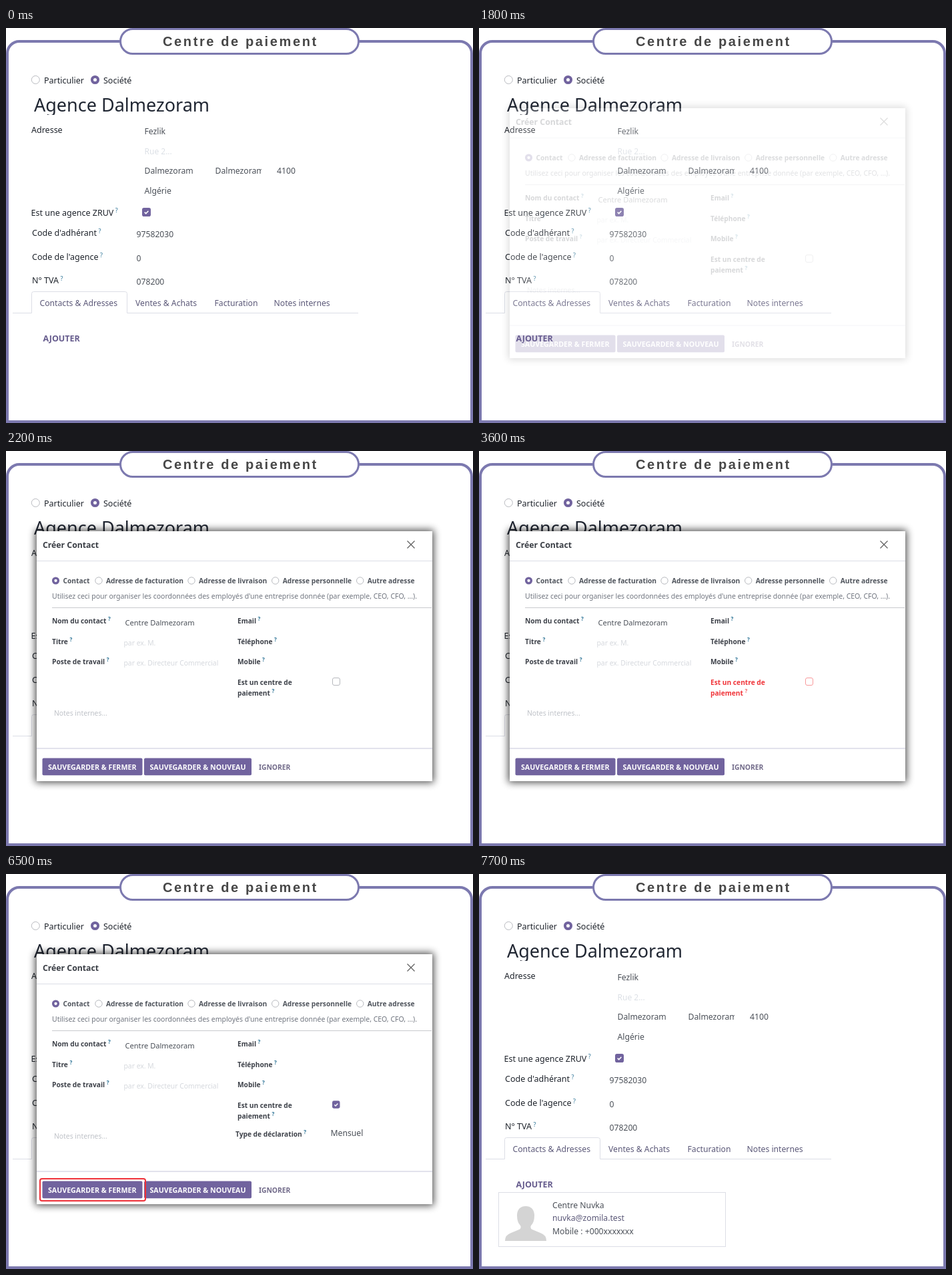
These frames come from a looping animation (700x591 px, 8000 ms). An HTML page:

```html
<!DOCTYPE html>
<html lang="fr">
<head>
<meta charset="utf-8">
<title>Centre de paiement</title>
<style>
html, body { margin: 0; width: 100%; height: 100%; overflow: hidden; background: #fff; }
svg { display: block; width: 100%; height: 100%; }
text { font-family: "Noto Sans", "Open Sans", sans-serif; white-space: pre; }
.head { font: bold 20px "Liberation Sans", Arial, sans-serif; letter-spacing: 2.62px; fill: #474747; }
.title { font-size: 27px; fill: #212733; }
.label { font-size: 12.5px; font-weight: 500; fill: #1f242c; }
.value { font-size: 12.2px; fill: #4b5058; }
.tab { font-size: 12.2px; fill: #5b5878; }
.add { font-size: 12.5px; font-weight: 600; fill: #665c8d; }
.ghost { font-size: 12px; fill: #dce0e6; }
.mTitle { font-size: 12.25px; font-weight: 600; fill: #3a3e45; }
.mLabel { font-size: 10.2px; font-weight: 600; fill: #3d4149; }
.mKind { font-size: 10.25px; font-weight: 600; fill: #50555d; }
.mNote { font-size: 10.46px; fill: #70757f; }
.mGhost { font-size: 10.35px; fill: #d6d9de; }
.mGhost.dark { fill: #bfc2c8; }
.mValue { font-size: 11.1px; fill: #4b5058; }
.mButton { font-size: 10.65px; font-weight: 600; fill: #fff; }
.mSkip { font-size: 10.3px; font-weight: 600; fill: #716a89; }
.hint { font-size: 9px; font-weight: 500; fill: #2c7396; }
.mLabel .hint { font-size: 8px; font-weight: 600; }
.alert .mLabel { fill: #f0353a; }
.alert .hint { fill: #f2676a; }
.alert rect { stroke: #f99a9c; }
.ring { fill: none; stroke: #ef3038; stroke-width: 2; }
.line { fill: none; stroke: #dcdee6; }
</style>
</head>
<body>
<svg id="stage" viewBox="0 0 700 591" xmlns="http://www.w3.org/2000/svg"></svg>
<script>
const PURPLE = '#71639e';
const FRAME = '#7c79af';
const LOOP = 8000;

const text = (cls, x, y, s) =>
  `<text class="${cls}" x="${x}" y="${y}">${s.replace(/&/g, '&amp;')}</text>`;

const hinted = (cls, x, y, s) =>
  `<text class="${cls}" x="${x}" y="${y}">${s}<tspan class="hint" dx="2.5" dy="-4.5">?</tspan></text>`;

const radio = (x, y, r, on) => on
  ? `<circle cx="${x}" cy="${y}" r="${r * 0.7}" fill="#fff" stroke="${PURPLE}" stroke-width="${r * 0.62}"/>`
  : `<circle cx="${x}" cy="${y}" r="${r - 0.3}" fill="#fff" stroke="#b9bbc0"/>`;

const checked = (x, y, size) =>
  `<g transform="translate(${x} ${y}) scale(${size / 13})">
    <rect width="13" height="13" rx="2.8" fill="${PURPLE}"/>
    <path d="M3.7 6.7 5.7 8.6 9.4 4.7" fill="none" stroke="#fff" stroke-width="1.6"/>
  </g>`;

const button = (x, w, s) =>
  `<rect x="${x}" y="459.5" width="${w}" height="25.7" rx="2" fill="${PURPLE}"/>` +
  text('mButton', x + 8.5, 476.5, s);

const town = 'Dalmezoram';

const form = `
  ${radio(44.3, 77.5, 6.3)}${text('label', 57, 82.5, 'Particulier')}
  ${radio(133.5, 77.5, 6.5, true)}${text('label', 146, 82.5, 'Société')}
  <g clip-path="url(#titleClip)">${text('title', 42, 125, 'Agence ' + town)}</g>
  ${text('label', 38, 157, 'Adresse')}
  ${text('value', 207.5, 159, 'Fezlik')}
  ${text('ghost', 207.5, 189, 'Rue 2...')}
  ${text('value', 207.5, 218, town)}
  <g clip-path="url(#cityClip)">${text('value', 313.5, 218, town)}</g>
  ${text('value', 406, 218, '4100')}
  ${text('value', 207.5, 248, 'Algérie')}
  ${hinted('label', 37.5, 280.5, 'Est une agence ZRUV')}${checked(204, 269, 13)}
  ${hinted('label', 39, 311, "Code d'adhérant")}${text('value', 195.5, 313, '97582030')}
  ${hinted('label', 39, 347, "Code de l'agence")}${text('value', 195.5, 349, '0')}
  ${hinted('label', 39, 382, 'N° TVA')}${text('value', 195.5, 384, '078200')}
  <path class="line" d="M10 426.5H38.5V397.5q0-3 3-3H178.5q3 0 3 3V426.5H528"/>
  ${text('tab', 50.5, 416, 'Contacts & Adresses')}
  ${text('tab', 194, 416, 'Ventes & Achats')}
  ${text('tab', 312.5, 416, 'Facturation')}
  ${text('tab', 401.5, 416, 'Notes internes')}
  ${text('add', 55.5, 469, 'AJOUTER')}
  <rect id="addRing" class="ring" x="38" y="447" width="91" height="33" rx="3"/>`;

const card = `
  <g id="card">
    <rect class="line" x="29.5" y="476.5" width="340" height="81"/>
    <path fill="#d4d4d4" d="M39 549q0-9 9-12l12-5q4-2 2-6-5-5-5-15c0-9 5-14 13-14s13 5 13 14q0 10-5 15-2 4 2 6l12 5q9 3 9 12z"/>
    ${text('value', 110, 500, 'Centre Nuvka')}
    ${text('tab', 110, 519, 'nuvka@zomila.test')}
    ${text('value', 110, 539, 'Mobile : +000xxxxxxx')}
  </g>`;

const kinds = [
  [74.5, 'Contact'], [139, 'Adresse de facturation'], [278, 'Adresse de livraison'],
  [403.7, 'Adresse personnelle'], [530.7, 'Autre adresse']
].map(([x, s], i) => radio(x, 194, 5.5, !i) + text('mKind', x + 11, 198, s)).join('');

const modal = `
  <g id="modal">
    <rect x="44" y="118" width="597" height="378" fill="#000" opacity=".7" filter="url(#blur)"/>
    <rect x="46" y="120" width="593" height="374" fill="#fff"/>
    ${text('mTitle', 55, 145, 'Créer Contact')}
    <path d="M601.5 134.5l11 11m0-11l-11 11" stroke="#666" stroke-width="1.4"/>
    <path class="line" d="M46 164.5H639"/>
    ${kinds}
    ${text('mNote', 69, 220.5, "Utilisez ceci pour organiser les coordonnées des employés d'une entreprise donnée (par exemple, CEO, CFO, ...).")}
    <path d="M69 234.5H638" stroke="#c9cace"/>
    ${hinted('mLabel', 69, 258, 'Nom du contact')}${text('mValue', 178.5, 260.5, 'Centre ' + town)}
    ${hinted('mLabel', 69, 289, 'Titre')}${text('mGhost', 176.5, 291, 'par ex. M.')}
    ${hinted('mLabel', 69, 319, 'Poste de travail')}${text('mGhost', 176.5, 321, 'par ex. Directeur Commercial')}
    ${hinted('mLabel', 347, 258, 'Email')}
    ${hinted('mLabel', 347, 289, 'Téléphone')}
    ${hinted('mLabel', 347, 319, 'Mobile')}
    <g id="center">
      ${text('mLabel', 347, 350, 'Est un centre de')}
      ${hinted('mLabel', 347, 366, 'paiement')}
      <rect x="489.5" y="339.5" width="11" height="11" rx="2.5" fill="#fff" stroke="#b7b9be"/>
    </g>
    ${text('mGhost dark', 72, 396, 'Notes internes...')}
    <path d="M46 445H639" stroke="#d9d8e6" stroke-width="1.6"/>
    ${button(54.5, 150, 'SAUVEGARDER & FERMER')}
    ${button(207, 161, 'SAUVEGARDER & NOUVEAU')}
    ${text('mSkip', 379, 476.5, 'IGNORER')}
    <g id="kind">
      <rect x="488" y="338" width="13" height="14" fill="#fff"/>
      ${checked(489, 339.3, 11.5)}
      ${hinted('mLabel', 344, 393, 'Type de déclaration')}
    </g>
    <g id="list">
      <path d="M588.5 385h8l-4 4.5z" fill="#333"/>
      <rect x="482" y="401" width="115" height="55" fill="#000" opacity=".4" filter="url(#softBlur)"/>
      <rect x="481.5" y="399.5" width="114" height="55" fill="#f8f9fa" stroke="#8a8d92"/>
      <rect x="481" y="400" width="115" height="18" fill="#1e90ee"/>
      ${text('value', 486, 432, 'Mensuel')}
      <g font-size="11.8">${text('', 486, 450, 'Trimestriel').replace('<text', '<text fill="#4b5058"')}</g>
    </g>
    <g id="choice">${text('value', 486.5, 392, 'Mensuel')}</g>
    <rect id="saveRing" class="ring" x="51" y="456" width="158" height="33" rx="3"/>
  </g>`.replace(/<g font-size="11.8">.*<\/g>/, text('value', 486, 450, 'Trimestriel'));

const stage = document.getElementById('stage');
stage.innerHTML = `
  <defs>
    <filter id="blur" x="-10%" y="-10%" width="120%" height="120%"><feGaussianBlur stdDeviation="6"/></filter>
    <filter id="softBlur" x="-10%" y="-20%" width="120%" height="140%"><feGaussianBlur stdDeviation="2.2"/></filter>
    <clipPath id="titleClip"><rect x="30" y="95" width="300" height="35"/></clipPath>
    <clipPath id="cityClip"><rect x="310" y="200" width="73" height="25"/></clipPath>
  </defs>
  <rect width="700" height="591" fill="#fff"/>
  <path d="M2 589V38A18 18 0 0 1 20 20H680A18 18 0 0 1 698 38V589Z" fill="#fff" stroke="${FRAME}" stroke-width="4"/>
  <rect x="171.5" y="1.5" width="357" height="37" rx="18.5" fill="#fff" stroke="${FRAME}" stroke-width="3"/>
  ${text('head', 235, 27, 'Centre de paiement')}
  ${form}${card}${modal}`;

const part = id => document.getElementById(id);
const [addRing, cardBox, modalBox, center, kind, list, choice, saveRing] =
  ['addRing', 'card', 'modal', 'center', 'kind', 'list', 'choice', 'saveRing'].map(part);

// Fade in n equal jumps, 100 ms apart.
const fade = (t, start, n) =>
  Math.max(0, Math.min(n, Math.floor((t - start) / 100) + 1)) / n;

// Two flashes of 200 ms.
const flash = (t, start) =>
  (t >= start && t < start + 200) || (t >= start + 400 && t < start + 600);

function show(el, alpha) {
  el.style.display = alpha ? '' : 'none';
  el.style.opacity = alpha;
}

function draw(t) {
  const done = fade(t, 7300, 5);
  const picked = fade(t, 5800, 3);
  show(addRing, +flash(t, 1000));
  show(modalBox, fade(t, 1800, 5) * (1 - done));
  show(cardBox, done);
  center.setAttribute('class', flash(t, 3200) ? 'alert' : '');
  show(kind, fade(t, 4000, 4));
  show(list, t >= 5300 ? 1 - picked : 0);
  show(choice, picked);
  show(saveRing, +flash(t, 6500));
}

const begin = performance.now();
function tick() {
  draw((performance.now() - begin) % LOOP);
  requestAnimationFrame(tick);
}
tick();
</script>
</body>
</html>
```
